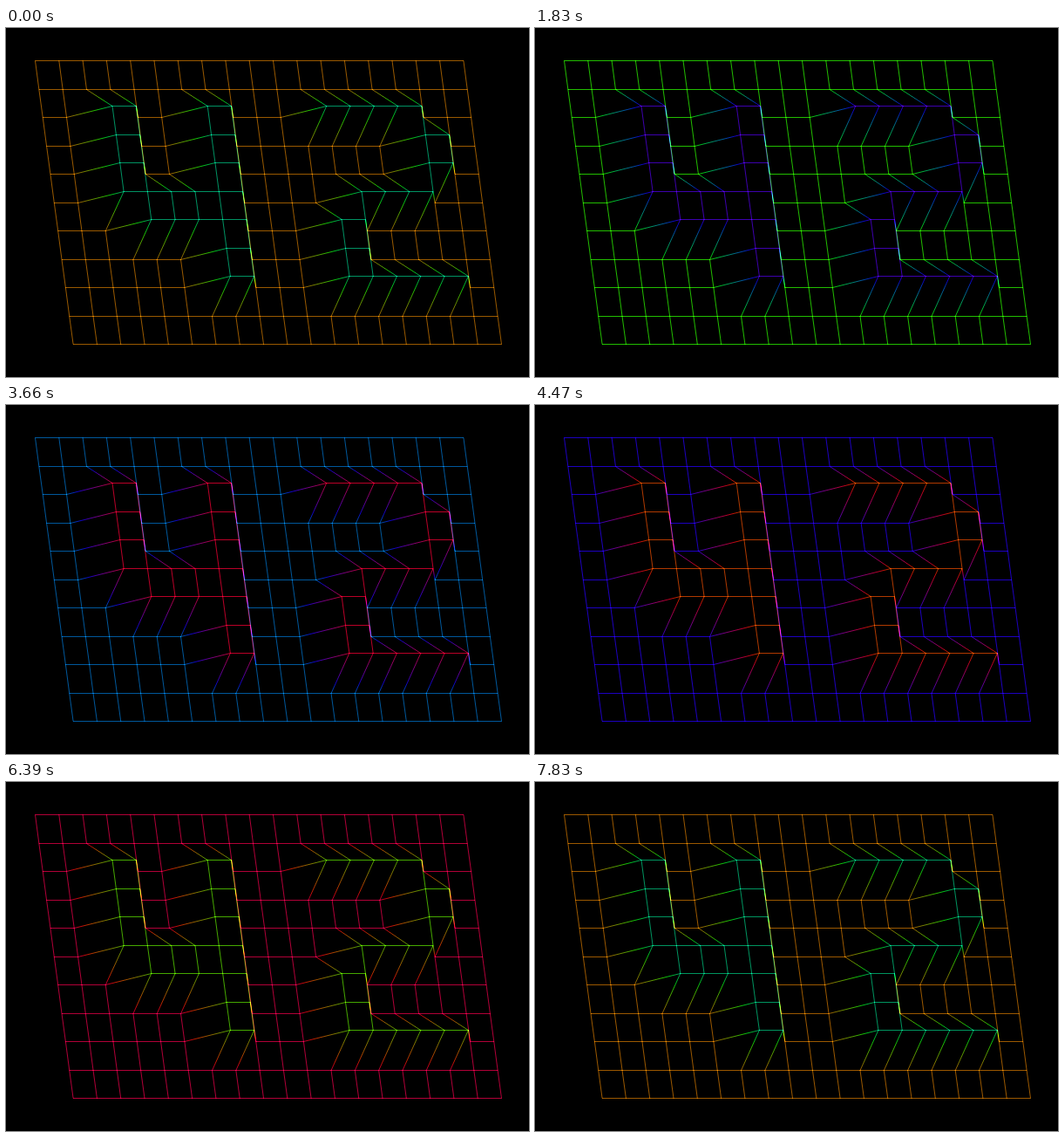
An HTML page with a canvas for the animation above (7.86 s loop, 600 by 400 pixels).

```html
<!DOCTYPE html>
<html lang="en">
<head>
<meta charset="utf-8">
<title>Wireframe 42</title>
<style>
  html, body { margin: 0; width: 100%; height: 100%; overflow: hidden; background: #000; }
  canvas { display: block; }
</style>
</head>
<body>
<canvas id="stage" width="600" height="400"></canvas>
<script>
const W = 600, H = 400, STEP = 30, STEPS = 262;
const LIFT = 0.37; // how far raised points run ahead in the colour cycle

const relief = [
  '...................',
  '...................',
  '..##..##...#####...',
  '..##..##.......##..',
  '..##..##.......##..',
  '..######....####...',
  '...#####...##......',
  '......##...##......',
  '......##...######..',
  '...................',
  '...................'
];

function project(col, row) {
  const z = relief[row][col] === '#' ? 1 : 0;
  return {
    x: 33.5 + col * 27.3 + row * 4.36 + z * 25.2,
    y: Math.floor(37.8 + row * 32.5 - z * 12.9) + 0.5,
    z
  };
}

const lines = [];
for (let row = 0; row < relief.length; row++) {
  for (let col = 0; col < relief[row].length; col++) {
    const p = project(col, row);
    if (col + 1 < relief[row].length) lines.push([p, project(col + 1, row)]);
    if (row + 1 < relief.length) lines.push([p, project(col, row + 1)]);
  }
}

// Hue wheel of evenly bright colours; the hue runs a little unevenly
function colour(u) {
  const hue = 38 + 360 * u + 11 * Math.cos(2 * Math.PI * (u - 0.75));
  const channel = centre => {
    const away = Math.abs(((hue - centre) % 360 + 540) % 360 - 180);
    return Math.round(200 * Math.max(0, 1 - away / 120) ** 0.7);
  };
  return `rgb(${channel(0)},${channel(120)},${channel(240)})`;
}

const ctx = document.getElementById('stage').getContext('2d');

function stroke([a, b], u) {
  if (a.z === b.z) {
    ctx.strokeStyle = colour(u + a.z * LIFT);
  } else {
    const blend = ctx.createLinearGradient(a.x, a.y, b.x, b.y);
    for (let k = 0; k <= 1; k += 0.125) {
      blend.addColorStop(k, colour(u + (a.z + (b.z - a.z) * k) * LIFT));
    }
    ctx.strokeStyle = blend;
  }
  ctx.beginPath();
  ctx.moveTo(a.x, a.y);
  ctx.lineTo(b.x, b.y);
  ctx.stroke();
}

let shown = -1;

function draw() {
  const step = Math.floor(performance.now() / STEP) % STEPS;
  if (step !== shown) {
    shown = step;
    ctx.globalCompositeOperation = 'source-over';
    ctx.fillStyle = '#000';
    ctx.fillRect(0, 0, W, H);
    ctx.globalCompositeOperation = 'lighter';
    for (const line of lines) stroke(line, step / STEPS);
  }
  requestAnimationFrame(draw);
}
draw();
</script>
</body>
</html>
```
